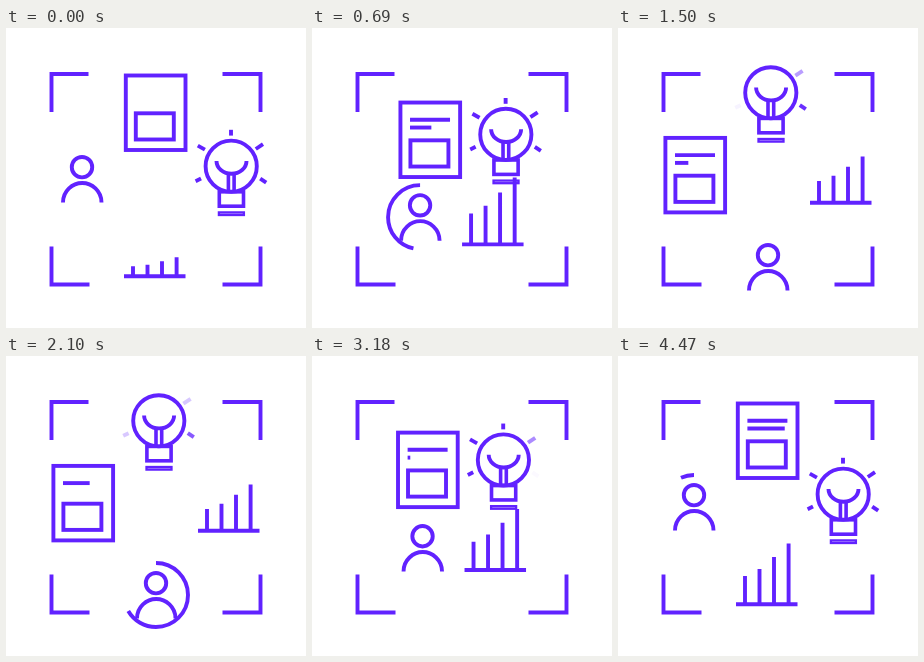
Animation, 300 px wide and 300 px high, one loop 4.5 s. Source, as an HTML page:

```html
<!DOCTYPE html>
<html lang="en">
<head>
<meta charset="utf-8">
<title>Idea to report</title>
<style>
html, body { margin: 0; width: 100%; height: 100%; overflow: hidden; background: #fff; }
svg { display: block; width: 100vw; height: 100vh; }
</style>
</head>
<body>
<svg viewBox="0 0 300 300" fill="none" stroke="#6122ff" stroke-width="3.9">
  <path d="M45.5 84V46H82.5M216.5 46H254.5V84M45.5 218.5V256.5H83.5M216.5 256.5H254.5V218.5"/>

  <g id="doc">
    <rect x="119.8" y="47.5" width="59.7" height="74.5"/>
    <rect x="129.8" y="85.3" width="38" height="26.2"/>
    <path id="line1"/>
    <path id="line2"/>
  </g>

  <g id="chart">
    <path d="M118 248.2H179.5"/>
    <path id="bars"/>
  </g>

  <g id="person">
    <circle cx="76" cy="139.2" r="10.2"/>
    <path d="M57 174.5C57 163 66.5 155 76.2 155S95.5 163 95.5 174.5"/>
    <circle id="ring" cx="76" cy="151" r="32" pathLength="360" transform="rotate(-90 76 151)"/>
  </g>

  <g id="bulb">
    <circle cx="225.2" cy="138.2" r="25.6"/>
    <path d="M210.5 133A15 12.8 0 0 0 240.5 133"/>
    <path d="M222.4 145V163.5M228.1 145V163.5" stroke-width="3.6"/>
    <rect x="213.3" y="163.8" width="24.2" height="14.4" stroke-width="3.6"/>
    <rect x="212.9" y="184.4" width="25" height="2.6" stroke-width="2.3"/>
    <g id="rays">
      <path d="M189.6 153.2L195 150.6"/>
      <path d="M191.8 117.6L198.9 121.6"/>
      <path d="M225 101.8V107.6"/>
      <path d="M249.8 121L257 116.2"/>
      <path d="M254.2 150.6L260.2 154.6"/>
    </g>
  </g>
</svg>
<script>
const LOOP = 4500, STEP = 30, BEAT = 900;
const $ = id => document.getElementById(id);
const clamp = x => Math.min(1, Math.max(0, x));
const span = (t, from, to) => clamp((t - from) / (to - from));
const smooth = u => u * u * (3 - 2 * u);
const mix = (a, b, u) => a + (b - a) * u;

const shifts = { doc: [-72.4, 62.4], bulb: [-72.4, -73.4], person: [74, 88], chart: [74, -73.4] };
// x, lowest and highest height of each bar
const bars = [[127, 10, 32], [141.5, 11.5, 40.3], [156, 15, 54], [170.6, 19, 69.5]];
const rays = [...$('rays').children];

function moveGroups(t) {
  const k = span(t, 300, 1200) - span(t, 2700, 3600);
  for (const [id, [dx, dy]] of Object.entries(shifts))
    $(id).setAttribute('transform', `translate(${dx * k} ${dy * k})`);
}

function typeLines(t) {
  const p = t % BEAT;
  $('line1').setAttribute('d', `M129.4 64.7h${40 * span(p, 0, 450)}`);
  $('line2').setAttribute('d', `M129.4 72.5h${40 * span(p, 450, 900)}`);
}

function drawRing(t) {
  const p = t % BEAT;
  const on = Math.floor(t / BEAT) % 2 === 0;
  const head = 360 * span(p, 0, 450), tail = 360 * span(p, 450, 900);
  $('ring').style.visibility = on && head > tail ? 'visible' : 'hidden';
  $('ring').setAttribute('stroke-dasharray', `0 ${tail} ${head - tail} 720`);
}

// Bars rise, sag a little, then mirror that back down
function growBars(t) {
  const p = t % (2 * BEAT), q = Math.min(p, 2 * BEAT - p);
  const k = smooth(span(q, 0, 570)) - 0.178 * smooth(span(q, 570, 900));
  $('bars').setAttribute('d', bars.map(([x, lo, hi]) => `M${x} 248.2v${-mix(lo, hi, k)}`).join(''));
}

// A fade travels clockwise and pauses while the bulb rests
function fadeRays(t) {
  const fade = 270, hold = 1552, resume = 2700;
  const clock = Math.min(t, hold) + Math.max(0, t - resume);
  rays.forEach((ray, i) => {
    const u = (clock - 945) / fade - i / 2;
    ray.setAttribute('opacity', 1 - clamp(u) + clamp(u - 2));
  });
}

function render(now) {
  const t = Math.floor((now + 1) / STEP) * STEP % LOOP;
  moveGroups(t);
  typeLines(t);
  drawRing(t);
  growBars(t);
  fadeRays(t);
}

function tick() {
  render(performance.now());
  requestAnimationFrame(tick);
}
render(0);
requestAnimationFrame(tick);
</script>
</body>
</html>
```
